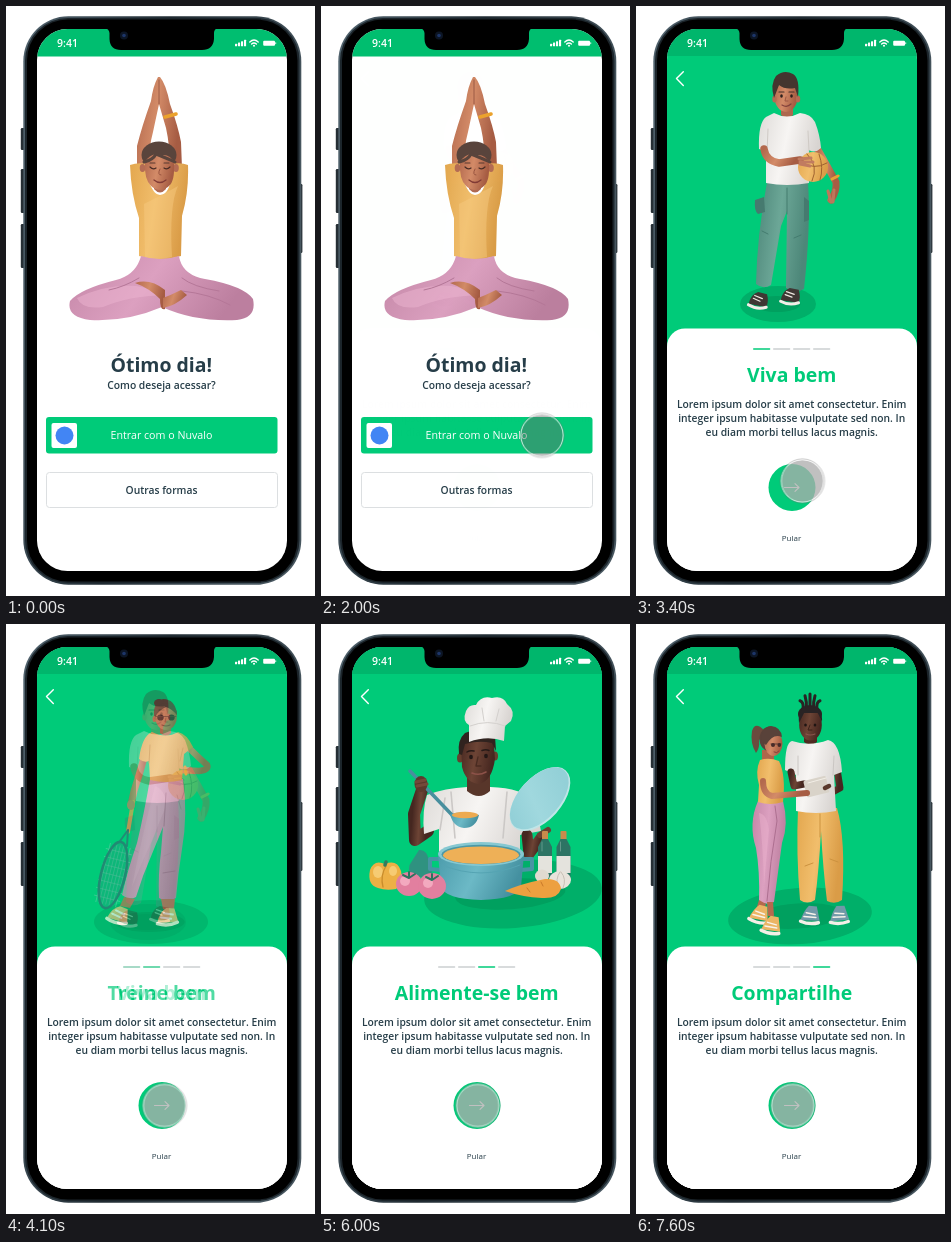
An HTML page that plays this animation: 309x590 px, repeating every 8000 ms.

```html
<!DOCTYPE html>
<html lang="pt">
<head>
<meta charset="utf-8">
<title>Onboarding</title>
<style>
html, body { margin: 0; width: 100%; height: 100%; overflow: hidden; background: #fff; }
svg { display: block; width: 309px; height: 590px; }
text { font: 600 10.3px "Open Sans", sans-serif; fill: #263d48; text-anchor: middle; }
.title { font-weight: 700; font-size: 19.45px; }
.green { fill: #00cb79; }
.white { fill: #fff; font-weight: 400; font-size: 10.67px; }
.small { font-weight: 400; font-size: 8px; }
.clock { font-size: 10.5px; fill: #fff; }
</style>
</head>
<body>
<svg id="stage" viewBox="0 0 309 590"></svg>
<script>
const LOOP = 8000;
const GREEN = '#00cb79';

// Drawing helpers
const p = (d, fill, extra = '') => `<path d="${d}" fill="${fill}" ${extra}/>`;
const ln = (d, color, w = 1, extra = '') =>
  `<path d="${d}" fill="none" stroke="${color}" stroke-width="${w}" stroke-linecap="round" stroke-linejoin="round" ${extra}/>`;
const el = (x, y, rx, ry, fill, rot = 0) =>
  `<ellipse cx="${x}" cy="${y}" rx="${rx}" ry="${ry}" fill="${fill}" transform="rotate(${rot} ${x} ${y})"/>`;
const box = (x, y, w, h, r, fill, extra = '') =>
  `<rect x="${x}" y="${y}" width="${w}" height="${h}" rx="${r}" fill="${fill}" ${extra}/>`;
const txt = (x, y, s, cls = '') => `<text x="${x}" y="${y}" class="${cls}">${s}</text>`;
const grad = (id, a, b, c) =>
  `<linearGradient id="${id}" x1="0" y1="0" x2="1" y2=".25"><stop stop-color="${a}"/>` +
  `<stop offset=".5" stop-color="${b}"/><stop offset="1" stop-color="${c}"/></linearGradient>`;
const shadow = (x, y, rx, ry, rot = 0) =>
  el(x, y, rx, ry, '#00af69', rot) + el(x - rx * .03, y, rx * .62, ry * .45, '#00a05f', rot);

const defs = `<defs>
  ${grad('skin', '#b3694d', '#d38b68', '#a65c43')}
  ${grad('dark', '#452720', '#6d4435', '#462720')}
  ${grad('pink', '#c486a7', '#dca0c0', '#bc7f9f')}
  ${grad('gold', '#e3a74f', '#f1be6c', '#da9c47')}
  ${grad('teal', '#4c8578', '#6ca797', '#4d8779')}
  ${grad('cloth', '#dedbd8', '#f7f5f3', '#d8d4d1')}
  ${grad('pot', '#4c9cac', '#6cb9c6', '#4490a0')}
  ${grad('lid', '#8ecdd5', '#a0d8de', '#93d0d7')}
  ${grad('rim', '#52646f', '#202b32', '#47565f')}
  <clipPath id="screen"><rect x="31" y="23" width="250" height="542" rx="30.5"/></clipPath>
</defs>`;

function yoga() {
  return p('M152 71 Q147 80 145 95 Q136 120 131 140 L131 162 L143 162 Q143 140 147 126 L153 98 L160 122 Q164 140 164 162 L176 162 L175 136 Q172 120 164 98 Q160 78 154 71Z', 'url(#skin)')
    + ln('M153 74 L153 98', '#8d4f3d', .8)
    + ln('M159 111 L170 108', '#eba22d', 3.6)
    + p('M124 159 Q132 156 141 158 L142 172 Q145 186 154 187 Q164 186 165 172 L166 158 Q175 156 182 159 Q183 186 176 210 L175 250 Q154 257 133 250 L133 212 Q125 188 124 159Z', 'url(#gold)')
    + p('M138 198 Q158 188 172 180 Q163 199 166 251 Q150 255 139 251Z', '#f7c980', 'opacity=".45"')
    + p('M144 174 L164 174 Q163 188 154 189 Q146 188 144 174Z', '#fff')
    + p('M148 172 H160 V183 Q154 190 148 183Z', '#b06a52')
    + el(153, 149, 17.5, 13.5, '#59443c')
    + el(136.5, 162, 2.8, 4, '#b46c54') + el(170, 162, 2.8, 4, '#b46c54')
    + p('M139 156 Q145 146 155 149 Q165 148 168 157 Q169 175 163 180 Q154 188 145 180 Q138 173 139 156Z', 'url(#skin)')
    + ln('M138 156 Q147 154 150 148 Q160 152 169 156', '#59443c', 3)
    + ln('M144 161 Q147 164 150 162 M158 162 Q161 164 164 161', '#4a2c25', 1.2)
    + ln('M144 157 L149 157 M158 157 L163 157', '#5b3a30', 1.1)
    + ln('M154 163 Q151 169 155 169', '#99543f', 1)
    + ln('M148 174 Q154 179 160 174', '#803a35', 1.3)
    + p('M135 250 Q154 256 173 250 Q176 269 199 273 Q238 280 247 293 Q251 312 231 314 Q189 316 156 301 Q121 316 84 314 Q60 311 64 295 Q74 283 110 274 Q130 269 135 250Z', 'url(#pink)')
    + p('M71 292 Q100 278 130 280 Q148 283 158 289 Q122 290 97 301 Q76 304 71 292Z', '#edb5d1', 'opacity=".5"')
    + ln('M176 285 Q204 288 224 299 M133 272 Q118 281 103 284 M176 272 Q187 281 213 285', '#b57798', 1)
    + p('M129 277 Q144 272 159 284 L159 303 Q154 305 154 293 Q143 282 129 277Z', 'url(#skin)')
    + p('M157 302 Q169 300 181 289 L175 284 Q165 289 157 292Z', 'url(#skin)');
}

function player() {
  const shoe = (x, y, r) => `<g transform="translate(${x} ${y}) rotate(${r})">`
    + p('M-9 4 Q-8 -6 -1 -9 L8 -8 Q11 -1 9 5Z', '#3f3734') + ln('M-9 5 Q0 9 9 5', '#f2ede7', 3)
    + ln('M-5 -2 L2 0 M-4 -5 L4 -3', '#efe9e2', 1.2) + '</g>';
  return shadow(142, 298, 38, 18)
    + ln('M181 142 Q190 158 200 176 Q201 185 195 194', 'url(#skin)', 7)
    + ln('M192 185 L195 196 M198 184 L197 196', '#bd775b', 3)
    + ln('M196 173 L202 170', '#e9a136', 3)
    + p('M131 176 H172 Q175 220 168 283 Q159 288 150 282 L151 205 L145 220 L135 279 Q127 284 120 278 Q121 230 131 176Z', 'url(#teal)')
    + p('M128 191 L119 194 Q118 205 122 208 L129 206Z M168 191 L173 195 V214 L168 216Z', '#467a6f')
    + ln('M151 182 V208 M126 225 L132 228 M158 232 L165 229', '#447c6f', 1)
    + shoe(122, 295, 8) + shoe(154, 291, 5)
    + p('M145 100 H157 V109 Q151 116 145 109Z', '#ad684f')
    + p('M138 107 Q151 114 164 107 Q175 108 179 116 Q184 129 185 142 Q179 148 173 144 L173 177 Q151 181 130 177 L130 145 L123 143 Q122 117 130 111Z', 'url(#cloth)')
    + ln('M132 123 L131 148 M172 125 L173 145', '#cfcac5', 1)
    + el(150, 91, 11.5, 15, 'url(#skin)')
    + el(138.5, 93, 2.2, 3.5, '#b46c54') + el(162, 93, 2.2, 3.5, '#b46c54')
    + p('M138 92 Q134 78 140 70 Q148 63 157 68 Q164 72 162 91 L159 82 Q149 84 143 79Z', '#44352f')
    + el(145.5, 90, 1.3, 1.7, '#2d211e') + el(155.5, 90, 1.3, 1.7, '#2d211e')
    + ln('M143 86 L148 86 M153 86 L158 86', '#44302a', 1.2)
    + ln('M150 91 L149 95 L152 95', '#9d5744', 1) + ln('M146 99 Q151 102 155 98', '#82413b', 1.2)
    + el(177, 161, 15, 15, 'url(#gold)')
    + ln('M164 155 Q178 165 191 157 M171 148 Q183 160 176 175 M183 148 Q188 162 184 174', '#9f6230', 1)
    + ln('M128 143 Q130 155 143 157 L164 154', 'url(#skin)', 7.5)
    + ln('M163 153 L175 152 M164 156 L177 156 M164 158 L174 160', '#c17c60', 3);
}

function tennis() {
  const shoe = (x, y, r) => `<g transform="translate(${x} ${y}) rotate(${r})">`
    + p('M-10 5 Q-7 -6 0 -9 L8 -8 L11 6Z', '#ebc27e') + ln('M-10 6 Q0 10 10 6', '#fff7e5', 3.5)
    + ln('M-6 0 L4 2 M-3 -4 L6 -2', '#fffaf0', 2) + '</g>';
  let strings = '';
  for (let i = -3; i < 4; i++) strings += `M${i * 3.4} -30 V30 M-13 ${i * 8} H13 `;
  return shadow(145, 298, 57, 22)
    + p('M144 155 H177 Q182 190 176 225 Q172 250 170 274 Q161 279 153 274 Q152 250 155 228 L157 203 Q146 230 137 252 L130 273 Q123 277 116 271 Q121 248 131 219 Q138 190 144 155Z', 'url(#pink)')
    + p('M149 162 Q160 166 160 182 L147 214 Q136 238 126 263 Q133 225 149 162Z', '#e9b0cc', 'opacity=".45"')
    + ln('M160 169 L158 202 M171 171 L175 185 M157 249 L169 247', '#ad6f90', 1)
    + p('M118 273 L129 275 L124 284 L114 282Z M155 275 H169 L168 285 H157Z', '#b9714f')
    + shoe(112, 291, 14) + shoe(161, 293, -4)
    + ln('M138 134 Q133 152 128 167 L125 181', 'url(#skin)', 7)
    + ln('M127 178 L122 208', '#eaa44a', 4) + ln('M122 206 L114 217 M122 206 L121 222', '#316f74', 2)
    + `<g transform="translate(107 251) rotate(14)">${ln(strings, '#a7cfc6', .45)}`
    + `<ellipse rx="12" ry="34" fill="#387a78" fill-opacity=".35" stroke="#2f6c71" stroke-width="2.6"/></g>`
    + el(125, 181, 4, 5, '#c47f5f')
    + ln('M181 122 Q193 134 201 141 Q203 146 193 147 L173 146', 'url(#skin)', 6.5)
    + ln('M179 143 L180 150', '#e59f31', 3)
    + p('M154 99 H165 V109 Q160 115 154 109Z', '#ad674b')
    + p('M146 108 Q160 115 172 108 Q181 110 187 123 L178 130 L176 156 Q160 160 144 156 L143 137 Q138 139 133 135 Q136 112 146 108Z', 'url(#gold)')
    + ln('M144 121 L143 139 M177 124 L174 137', '#cf913f', 1)
    + p('M148 92 Q147 78 157 75 Q169 75 171 90 L168 96 L151 97Z', '#594239')
    + el(153, 79, 5, 4, '#594239')
    + el(148.5, 95, 2, 3, '#ad674b')
    + el(160, 93, 10.8, 13, 'url(#skin)')
    + p('M149 93 Q147 80 160 79 Q171 81 171 91 Q166 85 160 83 Q153 86 149 93Z', '#594239')
    + el(154.5, 93.5, 3.2, 3.1, '#43282a') + el(165.5, 93.5, 3.2, 3.1, '#43282a')
    + ln('M150 92.5 H170', '#5b3834', .7) + ln('M160 94 L159 98 L162 98', '#9d5744', .9)
    + ln('M156 101 Q160 103 164 101', '#8a433e', 1.2);
}

function chef() {
  const tomato = (x, y, r) => el(x, y, r, r * .92, '#e27f9f') + el(x - 4, y - 3, 5, 5, '#f3a9bf')
    + ln(`M${x - 6} ${y - 9} L${x} ${y - 6} L${x + 6} ${y - 10} M${x} ${y - 6} V${y - 12}`, '#2c745f', 2);
  const bottle = x => box(x - 3, 207, 6, 9, 1, '#c98b4c') + p(`M${x - 3} 215 H${x + 3} L${x + 7} 223 V254 H${x - 7} V223Z`, '#2d7464')
    + box(x - 7, 232, 14, 17, 0, '#e4e3dd') + ln(`M${x - 3} 218 V227`, '#62988a', 1);
  return shadow(192, 270, 89, 34, -4)
    + ln('M107 207 L94 216 L93 190 L101 166', 'url(#dark)', 12)
    + p('M106 171 Q124 164 146 163 L169 163 Q202 164 214 178 L220 207 L199 211 V233 H118 V205 L103 210 Q101 186 106 171Z', 'url(#cloth)')
    + ln('M124 174 L119 206 M130 168 L134 214 M186 168 L182 214', '#cbc8c6', 1.6)
    + ln('M206 211 L208 230 L220 214', 'url(#dark)', 11)
    + p('M146 149 H169 V167 Q158 177 146 167Z', '#58362a')
    + el(139, 134, 3, 4.5, '#65402f') + el(174, 132, 3, 4.5, '#65402f')
    + p('M140 119 Q140 110 149 108 L172 109 L174 135 Q171 157 158 160 Q145 159 141 143Z', 'url(#dark)')
    + p('M138 130 Q136 116 144 109 Q158 103 174 112 L175 127 L171 119 Q158 116 144 120 L141 131Z', '#30231f')
    + el(150, 133, 1.9, 2.3, '#241816') + el(165, 132, 1.9, 2.3, '#241816')
    + ln('M146 128 Q149 126 153 127 M161 126.5 Q165 125 168 126.5', '#271a17', 1.5)
    + ln('M157 133 L155 142 L160 142', '#492b21', 1.3) + ln('M151 149 Q158 152 165 148', '#8d5249', 1.6)
    + p('M148 118 L148 101 Q141 97 145 87 Q148 80 155 81 Q160 71 171 74 Q182 71 186 80 Q195 87 190 97 L184 102 L183 117 Q166 111 148 118Z', 'url(#cloth)')
    + ln('M149 102 Q167 95 184 102 M161 84 L163 97 M178 85 L175 97', '#d3d0cd', 1)
    + ln('M89 147 L132 192', '#488f9e', 3.5)
    + el(100, 160, 6.5, 8, '#5c392c') + ln('M95 158 L104 156 M96 162 L106 160', '#73493a', 3)
    + p('M129 190 Q144 186 158 191 Q155 204 143 204 Q132 203 129 190Z', 'url(#pot)') + el(144, 191, 13, 3.2, '#edaa50')
    + el(219, 175, 38.5, 21.5, '#bfe5e7', -48) + el(218.3, 174.3, 37.5, 20.5, 'url(#lid)', -48)
    + ln('M219 211 L227 206', '#6a4232', 6)
    + bottle(224) + bottle(242.5)
    + p('M64 240 Q76 235 80 247 Q83 260 75 265 Q65 267 57 264 Q46 261 49 246 Q53 235 64 240Z', '#edb045')
    + el(57, 248, 5, 6, '#f6cb73') + el(72, 247, 4, 5, '#f6cb73')
    + ln('M65 242 Q59 252 62 263', '#c98d2c', 1.3) + ln('M64 241 L65 238', '#347b5e', 3.5)
    + p('M98 226 Q106 225 108 237 Q116 249 105 253 H91 Q85 244 91 237Z', '#2f9280')
    + ln('M119 235 H109 V245 L120 246 M201 235 H211 V245 L200 246', '#4795a4', 4)
    + p('M117 230 H203 L200 263 Q196 275 160 276 Q124 275 120 263Z', 'url(#pot)')
    + el(160, 230, 43, 12, '#86c8d1') + el(160, 230.5, 39.5, 9.8, '#4a98a7')
    + el(160, 231.2, 38, 8.8, '#eeb057')
    + ln('M121 241 Q160 257 199 241', '#55a4b3', 1)
    + tomato(88, 260, 13) + tomato(111, 262, 14)
    + el(239, 256, 11, 9, '#e8e3db') + el(221, 252, 7, 6.5, '#e0dad0') + ln('M239 248 Q234 255 237 264 M240 248 Q246 255 242 264', '#c7bfb5', 1)
    + p('M184 267 Q199 260 224 255 Q239 254 240 265 Q237 275 221 274 Q201 273 184 267Z', '#eda040')
    + ln('M206 264 L209 268 M220 258 L222 262', '#c9792a', 1);
}

function couple() {
  const shoe = (x, y, c, r) => `<g transform="translate(${x} ${y}) rotate(${r})">`
    + p('M-9 5 Q-7 -4 -2 -10 L6 -10 L10 4Z', c) + ln('M-9 6 Q0 9 9 6', '#f4efe7', 3.4)
    + ln('M-4 -3 L5 -2 M-6 1 L6 1', '#f8f3ea', 1.5) + '</g>';
  let locks = '';
  for (let i = -2; i < 3; i++) locks += `M${174 + i * 3.5} 86 Q${174 + i * 3} 78 ${174 + i * 5} ${70 + i * i * 1.7} `;
  return shadow(164, 292, 72, 28, -4)
    + p('M162 184 H201 Q210 215 206 276 Q199 281 191 277 Q187 245 185 207 Q183 245 179 276 Q171 281 164 276 Q160 230 162 184Z', 'url(#gold)')
    + ln('M184 190 V213 M169 242 L177 239 M194 235 L202 238', '#cc923f', 1)
    + shoe(174, 292, '#7199a8', 5) + shoe(203, 292, '#7199a8', -3)
    + p('M168 108 H181 V118 Q174 124 168 118Z', '#4f2c22')
    + ln('M201 145 L204 164 L191 171', 'url(#dark)', 7)
    + p('M156 117 Q174 123 192 116 Q204 118 206 148 L198 151 L200 187 Q180 191 160 187 V151 L149 146 Q149 118 156 117Z', 'url(#cloth)')
    + ln('M162 132 V151 M198 132 L197 151', '#cac6c3', 1)
    + ln(locks, '#292324', 3) + el(174, 90, 12, 9, '#292324')
    + el(174.5, 101, 11.3, 15.5, 'url(#dark)') + p('M163 99 Q161 83 174 82 Q187 84 186 98 L182 89 H168Z', '#292324')
    + el(169.5, 101, 1.3, 1.5, '#1f1513') + el(179, 101, 1.3, 1.5, '#1f1513')
    + ln('M174 101 L172 106 L176 106', '#3b2019', 1) + ln('M170 110 Q174 112 179 110', '#8a564d', 1.2)
    + p('M122 177 H147 Q153 200 146 219 L138 278 Q130 282 123 277 Q124 248 120 224 Q112 200 122 177Z', 'url(#pink)')
    + p('M123 189 Q131 190 133 206 L128 262 Q127 220 123 189Z', '#e9b0cc', 'opacity=".5"')
    + ln('M139 182 L141 197 Q134 238 131 277', '#ad6f90', 1)
    + p('M123 276 L130 280 L127 288 L120 286Z M131 278 L137 278 L138 292 H132Z', '#b46a4e')
    + shoe(123, 291, '#ebb565', 14) + shoe(135, 302, '#ebb565', 10)
    + p('M126 126 H138 V137 H126Z', '#ad674b')
    + p('M124 136 Q133 133 143 137 Q150 151 147 178 Q134 182 122 178 L123 161 Q119 147 124 136Z', 'url(#gold)')
    + p('M128 106 Q119 97 116 107 Q114 119 120 129 Q124 124 123 116 L129 111Z', '#6b4b3e')
    + el(134, 115, 10.5, 12.5, '#59423a') + el(137.5, 119.5, 9, 12.5, 'url(#skin)')
    + p('M126 118 Q124 103 135 102 Q145 103 146 113 Q137 109 130 121Z', '#59423a')
    + ln('M135 120 H145', '#4a302d', .8) + el(137, 121, 2, 1.9, '#472b29') + el(143.3, 121, 1.8, 1.9, '#472b29')
    + ln('M138 128 Q141 130 143 127', '#883f3b', 1)
    + ln('M155 148 L158 162 L168 160', 'url(#dark)', 7)
    + box(169, 154, 23, 17, 1.5, '#d9d3c9', 'transform="rotate(-14 181 163)"')
    + ln('M172 159 L190 154', '#f2eee6', 1)
    + ln('M127 157 Q127 170 136 172 L171 169', 'url(#skin)', 6)
    + ln('M189 164 L193 162', '#5a382b', 4.5);
}

const login = () => box(31, 23, 250, 542, 0, '#fff') + box(31, 23, 250, 27.5, 0, '#00be70')
  + yoga()
  + txt(155.3, 366, 'Ótimo dia!', 'title') + txt(155.5, 383, 'Como deseja acessar?')
  + box(40, 411, 231.5, 36.5, 3, GREEN) + box(45.5, 417, 25.5, 25, 2, '#fff') + el(58.5, 429.5, 9, 9, '#4285f4')
  + txt(155.5, 433.3, 'Entrar com o Nuvalo', 'white')
  + box(40.5, 466.5, 231, 35, 3, '#fff', 'stroke="#dcdfe1"') + txt(155.5, 488, 'Outras formas');

const copy = ['Lorem ipsum dolor sit amet consectetur. Enim', 'integer ipsum habitasse vulputate sed non. In', 'eu diam morbi tellus lacus magnis.'];

function slide(title, art, active) {
  let tabs = '';
  for (let i = 0; i < 4; i++) tabs += box(117 + i * 20, 342.3, 17.3, 1.5, .7, i === active ? GREEN : '#cbcfd1');
  return box(31, 23, 250, 542, 0, GREEN) + box(31, 23, 250, 27, 0, '#00b66c')
    + ln('M47.3 65.7 L40.5 72.6 L47.3 79.5', '#fff', 1.4)
    + art()
    + box(31, 322.4, 250, 270, 18, '#fff') + tabs
    + txt(155.7, 376, title, 'title green')
    + copy.map((s, i) => txt(155.7, 402 + i * 14, s)).join('')
    + el(156, 481.5, 23.5, 23.5, GREEN)
    + ln('M148.5 481.5 H163 M159 477.7 L163 481.5 L159 485.3', '#fff', 1.1)
    + txt(155.5, 534.5, 'Pular', 'small');
}

// Each slide dissolves in over the one before it
const slides = [
  ['Viva bem', player, 2000, 2400],
  ['Treine bem', tennis, 3900, 4300],
  ['Alimente-se bem', chef, 5700, 6000],
  ['Compartilhe', couple, 7200, 7600],
];

const body = [[14.8, 122, 22], [14.8, 163, 44], [14.8, 218, 44], [292.4, 178, 69]]
  .map(([x, y, h]) => box(x, y, 4, h, 1.2, '#262f35')).join('')
  + box(17.3, 10.3, 278, 568.5, 45, 'url(#rim)') + box(19, 12, 274.5, 565, 43, '#1c252b')
  + box(21, 13.5, 270.5, 562, 41, '#000');

const status = p('M99 22 H212 Q208 23 208 27 V33 Q207 44 196 44 H115 Q104 44 103.5 33 V27 Q103 23 99 22Z', '#000')
  + el(118, 29.5, 4, 4, '#0c1524') + el(118, 29.5, 1.8, 1.8, '#1d3568')
  + txt(61.5, 40.5, '9:41', 'clock')
  + [2.5, 3.7, 5, 6.5].map((h, i) => box(229 + i * 3, 40.3 - h, 2.1, h, .5, '#fff')).join('')
  + ln('M243.8 36 Q248 32.2 252.2 36 M245.6 38 Q248 35.9 250.4 38', '#fff', 1.4) + el(248, 39.7, 1, 1, '#fff')
  + box(257.2, 34.7, 11.8, 5, 1, '#fff') + box(269.3, 36.2, .9, 2, .4, '#fff');

const cursor = `<g id="cursor"><circle id="dot" r="21"/><circle r="21.2" fill="none" stroke="#fff" stroke-width="1" opacity=".85"/>`
  + `<circle r="22.1" fill="none" stroke="#777" stroke-width=".8" opacity=".5"/></g>`;

const stage = document.getElementById('stage');
stage.innerHTML = defs + body + `<g clip-path="url(#screen)">${login()}`
  + slides.map(([title, art], i) => `<g class="slide">${slide(title, art, i)}</g>`).join('')
  + '</g>' + status + cursor;

const play = (node, steps) => node.animate(
  steps.map(([t, props, easing = 'linear']) => ({ offset: t / LOOP, easing, ...props })),
  { duration: LOOP, iterations: Infinity });

stage.querySelectorAll('.slide').forEach((node, i) => {
  const [, , from, to] = slides[i];
  play(node, [[0, { opacity: 0 }], [from, { opacity: 0 }, 'ease-out'], [to, { opacity: 1 }], [LOOP, { opacity: 1 }]]);
});

const hold = 'step-end';
const at = (x, y) => ({ transform: `translate(${x}px, ${y}px)` });
const dot = document.getElementById('dot');
const pointer = document.getElementById('cursor');

play(pointer, [
  [0, at(256, 148), hold],
  [1000, at(288, 193)], [1100, at(266, 310)], [1200, at(222, 425)], [1300, at(209, 452), 'ease-out'],
  [1400, at(221, 429)], [3100, at(221, 430), 'ease-in-out'], [3500, at(158.5, 481.5), hold],
  [5200, at(157.5, 481.5), hold], [5500, at(156.8, 481.5), hold], [LOOP, at(156.8, 481.5)],
]);
play(pointer, [
  [0, { opacity: 0 }, hold], [200, { opacity: 1 }, hold], [300, { opacity: 0 }, hold],
  [1000, { opacity: 1 }], [LOOP, { opacity: 1 }],
]);
const soft = { fill: 'rgba(104,104,104,.43)' };
const firm = { fill: 'rgba(174,174,174,.77)' };
play(dot, [[0, soft], [2000, soft], [2400, firm], [LOOP, firm]]);
</script>
</body>
</html>
```
